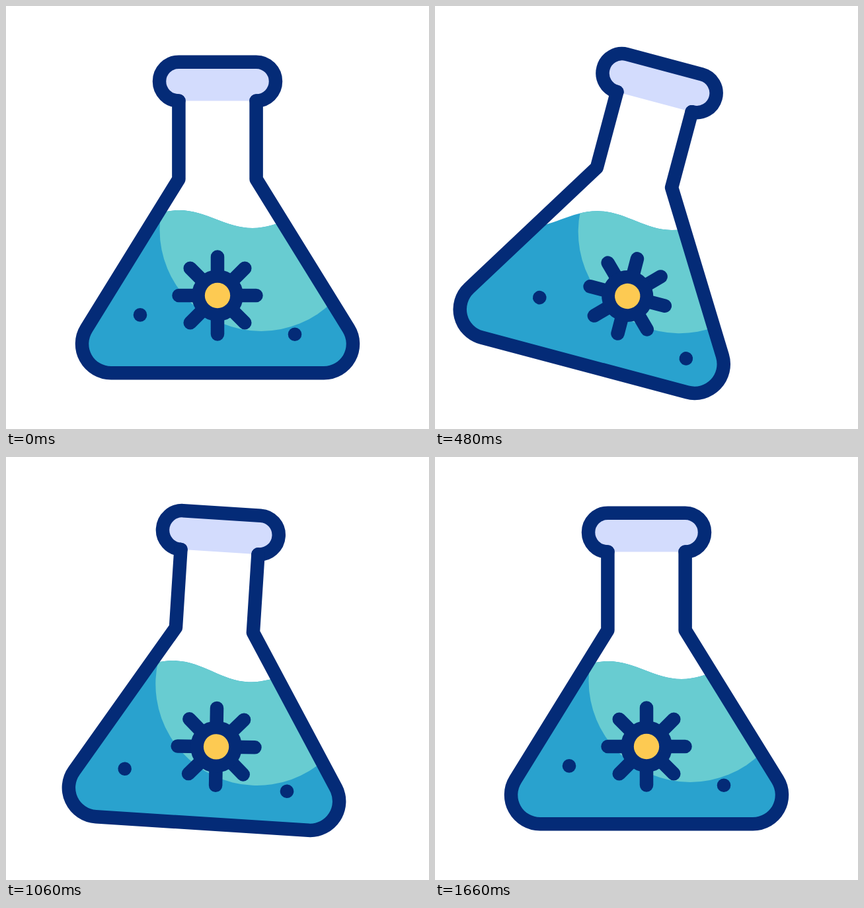
Write an HTML page that moves like this. It is 640x640 px and loops after 1700 ms.

```html
<!DOCTYPE html>
<html lang="en">
<head>
<meta charset="utf-8">
<title>Swinging flask</title>
<style>
html, body { margin: 0; height: 100%; overflow: hidden; background: #fff; }
svg { display: block; width: 100vw; height: 100vh; }
.line { fill: none; stroke: #042b77; stroke-width: 20.5; stroke-linecap: round; stroke-linejoin: round; }
.dark { fill: #042b77; }
</style>
</head>
<body>
<svg viewBox="0 0 640 640">
  <defs>
    <path id="cap" d="M261.4 143.5A29.4 29.4 0 0 1 261.4 84.7H378.6A29.4 29.4 0 0 1 378.6 143.5"/>
    <path id="body" d="M261.4 143.5V262L121.7 488A44 44 0 0 0 159 555.3H481A44 44 0 0 0 518.3 488L378.6 262V143.5"/>
    <path id="wave" d="M-100 336H151C191.400 336 221.600 309 262 309S332.600 336 373 336S443.600 309 484 309H740V800H-100Z"/>
    <clipPath id="inside"><use href="#body"/></clipPath>
    <clipPath id="below"><use href="#wave"/></clipPath>
  </defs>
  <g id="flask">
    <use href="#cap" fill="#d3dcfd"/>
    <g clip-path="url(#inside)">
      <g id="liquid">
        <use href="#wave" fill="#29a2ce"/>
        <circle cx="386" cy="338.500" r="153.500" fill="#68ccd1" clip-path="url(#below)"/>
      </g>
    </g>
    <circle id="left" class="dark" cx="203" cy="467.400" r="10.300"/>
    <circle id="right" class="dark" cx="437" cy="496.700" r="10.300"/>
    <g id="gear">
      <path class="line" d="M0-58.500V58.500M-58.500 0H58.500M-41.300-41.300L41.300 41.300M41.300-41.300L-41.300 41.300"/>
      <circle class="dark" r="39"/>
      <circle r="19.200" fill="#fdca52"/>
    </g>
    <use href="#cap" class="line"/>
    <use href="#body" class="line"/>
  </g>
</svg>
<script>
const LOOP = 1700, START = 20, END = 1645;
const SWING = [470, 805, 1100, 1390];
const SLOSH = [520, 800, 1100, 1400];
const LEFT = [560, 800, 1100, 1400];
const RIGHT = [505, 800, 1100, 1400];

// Eases from rest through the given values and back to rest.
function track(t, times, values) {
  const ts = [START, ...times, END], vs = [0, ...values, 0];
  if (t <= START || t >= END) return 0;
  const i = ts.findIndex(k => k > t);
  const u = (t - ts[i - 1]) / (ts[i] - ts[i - 1]);
  return vs[i - 1] + (vs[i] - vs[i - 1]) * u * u * (3 - 2 * u);
}

const place = (id, transform) =>
  document.getElementById(id).setAttribute("transform", transform);

function draw() {
  const t = performance.now() % LOOP;
  const at = (times, ...values) => track(t, times, values);

  place("flask", `rotate(${at(SWING, 15, -7.15, 4.2, -2.2)} 320 190)`);
  place("liquid", `translate(${at(SLOSH, 22, -11.5, 4.2, 4.9)} ${at(SLOSH, -15, 2.6, 0.8, 0.6)})
    rotate(${at(SLOSH, -14.2, 0.5, -1, -1.4)} 386 338.5)`);
  place("left", `translate(${at(LEFT, 27, -2.2, -5.2, 3)} ${at(LEFT, 7.4, 6, 13, 6)})`);
  place("right", `translate(${at(RIGHT, 29.5, -13.3, 9, 3.4)} ${at(RIGHT, 9.7, 5.2, 1.5, 0)})`);
  place("gear", `translate(${320 + at(SWING, 36.5, -17.6, 15.5, 0.4)} 438)
    rotate(${at(SWING, 90, -12, 45, 0.4)})`);
  requestAnimationFrame(draw);
}
draw();
</script>
</body>
</html>
```
